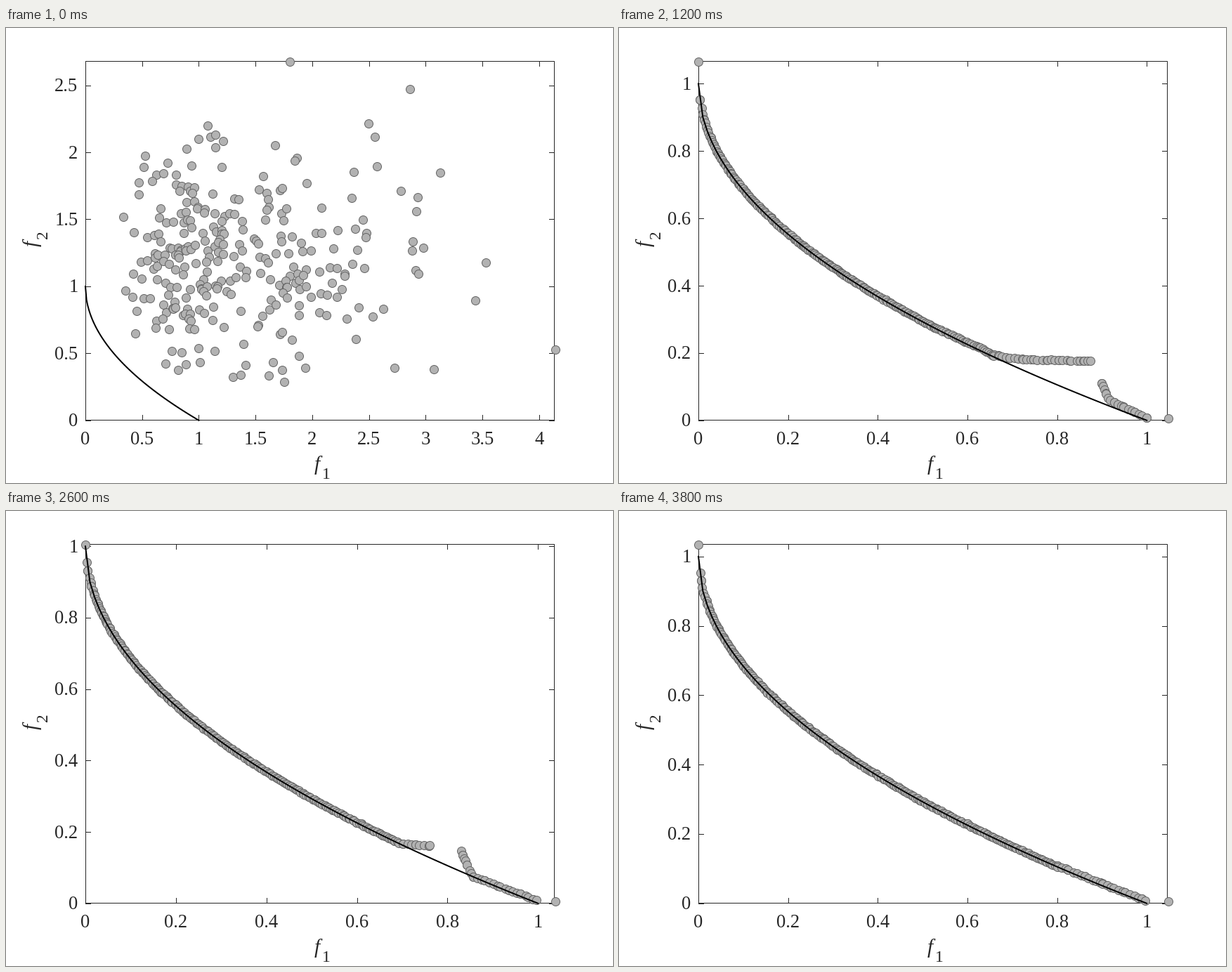
Write a matplotlib script that moves like this. It is 864 px wide and 648 px high and loops after 4 s.

```python
import numpy as np
import matplotlib.pyplot as plt
from matplotlib.animation import FuncAnimation

W, H, FRAMES, N = 864, 648, 20, 290
L, R, T, B = 113, 781.8, 48.2, 558.8     # data area in pixels
BR, BT, BB = 780, 47, 558                # box edges after pixel rounding
INK = "#262626"
plt.rcParams["font.family"] = "Liberation Serif"

# Stage: axis limits, scatter above the curve, f1 where the curve is left,
# then the shelf and the hook that still lie off the curve.
STAGES = {
    2: ((1.197, 1.245), .012, .30,
        [(.30, .462), (.47, .375), (.64, .35), (.675, .22), (.745, .22)],
        [(1, .18), (1, .1), (1.03, .04), (1.11, .006)]),
    4: ((1.1165, 1.029), .003, .435,
        [(.44, .352), (.58, .285), (.595, .25), (.665, .19), (.79, .187)],
        [(.971, .155), (.972, .1), (.995, .008)]),
    8: ((1.038, 1.07), .001, .665,
        [(.665, .186), (.7, .18), (.885, .174)],
        [(.888, .105), (.905, .055), (1, .006)]),
    13: ((1.038, 1.004), .001, .695,
         [(.7, .167), (.76, .16)],
         [(.828, .148), (.855, .075), (1, .006)]),
    17: ((1.038, 1.013), .001, .7,
         [(.7, .165), (.755, .142)],
         [(.755, .142), (.9, .056), (1, .006)]),
    19: ((1.048, 1.0335), .001, .8,
         [(.8, .108), (.9, .056)],
         [(.9, .056), (1, .006)]),
}


def pareto(a, b, n=400):
    x = np.linspace(a, b, n)
    return np.column_stack([x, 1 - np.sqrt(x)])


def to_px(f, lim):
    f = np.asarray(f, float)
    return np.column_stack([L + f[:, 0] / lim[0] * (R - L),
                            B - f[:, 1] / lim[1] * (B - T)])


def walk(line, lim, rng, gap, head=0):
    """Points along a line, `gap` pixels apart, sparser over its first part."""
    line = np.asarray(line)
    s = np.r_[0, np.cumsum(np.hypot(*np.diff(to_px(line, lim), axis=0).T))]
    k = np.arange(s[-1] / gap + 1)
    u = gap * k + head * (1.8 - np.exp(-k / 3)) + rng.uniform(-.3, .3, len(k)) * gap
    u = u[u <= s[-1] + gap / 2]
    return np.column_stack([np.interp(u, s, line[:, j]) for j in (0, 1)])


def in_order(f):
    return f[np.argsort(f[:, 0] - f[:, 1])]


def front(lim, noise, leave, shelf, hook):
    rng = np.random.default_rng(3)
    f = np.vstack([walk(pareto(0, leave), lim, rng, 3.2, head=30),
                   walk(shelf, lim, rng, 6), walk(hook, lim, rng, 6)])
    f += np.abs(rng.normal(0, noise, f.shape))
    f = in_order(np.vstack([(0, lim[1]), f, (lim[0], .005)]))
    return f[np.linspace(0, len(f) - 1, N).round().astype(int)]


def cloud(lim):
    rng = np.random.default_rng(7)
    pts = [(1.8, lim[1]), (lim[0], .53)]
    blobs = [((.9, 1.25), (.28, .42)), ((1.75, 1.15), (.35, .45)),
             ((2.5, 1.3), (.65, .6))]
    while len(pts) < N:
        x, y = rng.normal(*blobs[rng.choice(3, p=[.52, .32, .16])])
        if .28 < x < 3.7 and .26 < y < 2.6 and np.sqrt(x) + y > 1.25:
            pts.append((x, y))
    return in_order(np.array(pts))


START = np.array((4.142, 2.675))
KEYS = {0: (START, cloud(START))}
for k, stage in STAGES.items():
    KEYS[k] = np.array(stage[0]), front(*stage)


def state(i):
    """Limits and population; each stage eases out into the next."""
    a = max(k for k in KEYS if k <= i)
    b = min(k for k in KEYS if k >= i)
    u = 1 - (1 - (i - a) / max(b - a, 1)) ** 3
    f = (1 - u) * KEYS[a][1] + u * KEYS[b][1]
    return f.max(axis=0), f


fig = plt.figure(figsize=(W / 72, H / 72), dpi=72, facecolor="white")
ax = fig.add_axes([0, 0, 1, 1])
ax.set(xlim=(0, W), ylim=(H, 0))
ax.axis("off")

ax.plot([L, BR, BR, L, L], [BT, BT, BB, BB, BT], color=INK, lw=1, zorder=1)
ticks, = ax.plot([], [], color=INK, lw=1, zorder=1)
dots, = ax.plot([], [], "o", ms=12, mfc="#b2b2b2", mec="#666666", mew=1,
                zorder=2)
curve, = ax.plot([], [], color="black", lw=2, zorder=3)


def write(x, y, s, size=26.67, **kw):
    return ax.text(x, y, s, size=size, color=INK, va="baseline",
                   rotation_mode="anchor", **kw)


write(439, 630, "f", 29.3, style="italic")
write(449.5, 641.5, "1", 23.5)
write(45, 311, "f", 29.3, style="italic", rotation=90)
write(58.5, 300.5, "2", 23.5, rotation=90)
labels = []


def tick_values(top):
    step = .5 if top > 1.6 else .2
    return np.round(np.arange(0, top + 1e-9, step), 1)


def update(i):
    lim, f = state(i)
    dots.set_data(*to_px(f, lim).T)
    curve.set_data(*to_px(pareto(0, 1, 101), lim).T)

    while labels:
        labels.pop().remove()
    marks = []
    gap = (np.nan, np.nan)
    for v in tick_values(lim[0]):
        x = L + v / lim[0] * (R - L)
        labels.append(write(x, 593, f"{v:g}", ha="center"))
        marks += [(x, BB), (x, BB - 7), gap, (x, BT), (x, BT + 7), gap]
    for v in tick_values(lim[1]):
        y = B - v / lim[1] * (B - T)
        labels.append(write(102.5, y + 8.5, f"{v:g}", ha="right"))
        marks += [(L, y), (L + 7, y), gap, (BR, y), (BR - 7, y), gap]
    ticks.set_data(*np.array(marks).T)
    return [dots, curve, ticks, *labels]


anim = FuncAnimation(fig, update, frames=FRAMES, interval=200, repeat=True,
                     init_func=lambda: update(0), blit=False)
plt.show()
```
